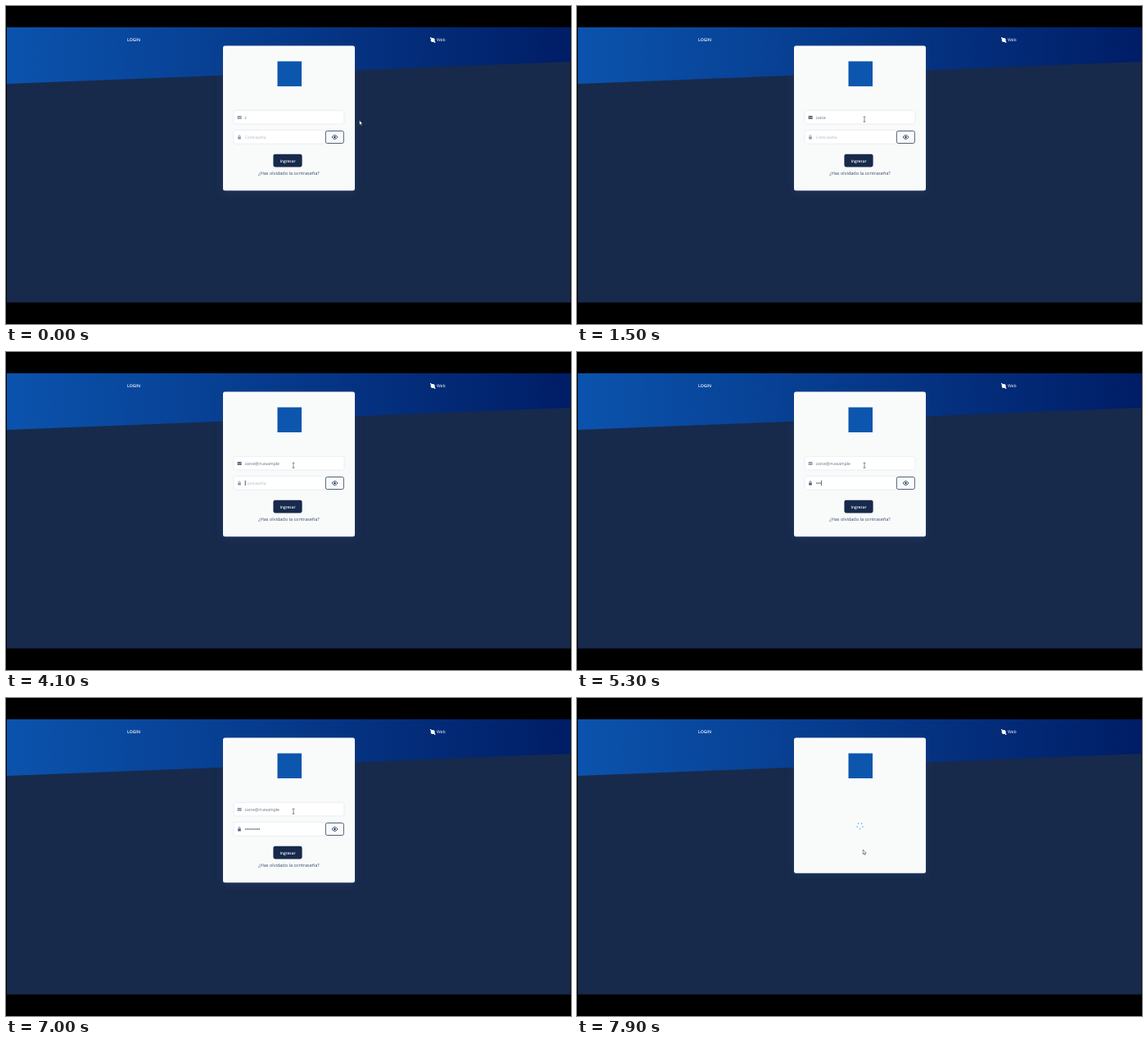
These frames come from a looping animation (690 by 388 pixels, 8 s). An HTML page:

```html
<!DOCTYPE html>
<html lang="es">
<head>
<meta charset="utf-8">
<title>Login</title>
<style>
  html, body { margin: 0; width: 100%; height: 100%; overflow: hidden; background: #000; }
  svg { display: block; width: 690px; height: 388px; }
  text { font-family: "Open Sans", "Noto Sans", sans-serif; text-rendering: geometricPrecision; white-space: pre; }
  .card { fill: #f9fbfb; filter: drop-shadow(0 2px 5px rgba(42, 64, 112, .5)); }
  .field { fill: #fff; filter: drop-shadow(0 .5px .8px rgba(50, 60, 93, .16)); }
  .typed { font-size: 4.95px; fill: #56627a; }
  .caret { fill: #222b3d; }
</style>
</head>
<body>
<svg viewBox="0 0 690 388">
  <defs>
    <linearGradient id="sky" gradientUnits="userSpaceOnUse" x1="1" y1="60" x2="689" y2="40">
      <stop offset="0" stop-color="#0b53ad"/>
      <stop offset=".5" stop-color="#06398a"/>
      <stop offset="1" stop-color="#001d66"/>
    </linearGradient>
  </defs>

  <rect width="690" height="388"/>
  <rect x="1" y="26" width="688.5" height="335.7" fill="#172a4c"/>
  <path d="M1 26H689.5V68L1 95Z" fill="url(#sky)"/>

  <g fill="#fff" font-size="5.1" font-weight="600">
    <text x="148" y="43.3">LOGIN</text>
    <text x="526" y="43.3" font-weight="500">Web</text>
    <circle cx="521.2" cy="41.5" r="2.5"/>
    <path d="M518.6 38.8L523.8 44.3" stroke="#fff" stroke-width="1.3" stroke-linecap="round"/>
  </g>

  <rect id="card" class="card" x="265" y="48.5" width="161" height="176.7" rx="2.5"/>
  <rect x="331.5" y="67.5" width="29.5" height="30.5" fill="#0d56ae"/>

  <g id="form">
    <rect class="field" x="278.5" y="128" width="134" height="15.5" rx="2"/>
    <rect class="field" x="278.5" y="152" width="112" height="15.8" rx="2"/>

    <g id="mail">
      <rect x="282.6" y="134" width="5" height="4" rx=".6"/>
      <path d="M282.7 135.1L285.1 136.7L287.5 135.1" fill="none" stroke="#fff" stroke-width=".5"/>
    </g>
    <g id="lock">
      <rect x="283.2" y="159.6" width="3.6" height="3" rx=".5"/>
      <path d="M284 159.7V158.6a1 1.1 0 0 1 2 0V159.7" fill="none" stroke="currentColor" stroke-width=".7"/>
    </g>

    <text id="email" class="typed" x="291.6" y="137.7"></text>
    <text id="hint" x="291.6" y="161.8" font-size="4.85" fill="#adb5c2">Contraseña</text>
    <g id="dots" fill="#303a4e"></g>
    <rect id="caret" class="caret" width=".7" height="6.4"/>

    <rect x="390.4" y="152.5" width="22" height="15" rx="2" fill="#f9fbfb" stroke="#2b3b5a" stroke-width=".8"/>
    <path d="M398 160Q401.5 155 405 160Q401.5 165 398 160Z" fill="none" stroke="#172a4c" stroke-width=".8"/>
    <circle cx="401.5" cy="160" r="1.2" fill="#172a4c"/>

    <rect x="326.4" y="180.8" width="35.2" height="15.6" rx="2.3" fill="#172a4c"/>
    <text x="344" y="190.5" font-size="4.8" font-weight="600" fill="#fff" text-anchor="middle">Ingresar</text>
    <text x="345.5" y="205.8" font-size="5.55" font-weight="500" fill="#344767" text-anchor="middle">¿Has olvidado la contraseña?</text>
  </g>

  <g id="spinner" fill="#79bdf0"></g>

  <g id="mouse">
    <path id="arrow" d="M0 0V5.6L1.3 4.5L2.1 6.4L3 6L2.2 4.1H3.9Z" fill="#fff" stroke="#222" stroke-width=".5"/>
    <path id="beam" d="M-1.4 -3H1.4M0 -3V3M-1.4 3H1.4" fill="none" stroke="#555" stroke-width=".7"/>
    <path id="hand" d="M-.6 .4Q0 -.4 .6 .4V2.6L3 3.2Q3.6 3.5 3.4 4.4L2.8 6.8H-.2L-2 4.4Q-1.8 3.4 -.6 4.2Z" fill="#fff" stroke="#222" stroke-width=".5"/>
  </g>
</svg>

<script>
const LOOP = 8000, LOAD = 7800, TAB = 4100;
const EMAIL = "zarce@m.example";
const emailKeys = [0, 300, 500, 1100, 1300, 2100, 2400, 2700, 2900, 3200, 3300, 3400, 3600, 3800, 4100];
const passKeys = [4700, 5100, 5300, 5500, 5600, 5800, 5900, 6000, 6200];
const caretOff = [[0, 200], [1500, 2100], [6400, 7200]];
// time, x, y
const path = [[0, 431.6, 139.5], [100, 431.6, 139.5], [700, 351, 138.3], [7100, 351, 138.3], [7600, 349, 186.8], [7800, 349.3, 185], [LOOP, 349.3, 185]];

const $ = id => document.getElementById(id);
const email = $("email"), caret = $("caret");
const count = (keys, t) => keys.filter(k => k <= t).length;
const show = (el, on) => el.setAttribute("visibility", on ? "inherit" : "hidden");
const clamp = v => Math.min(1, Math.max(0, v));

function circle(parent, cx, cy, r) {
  const c = document.createElementNS("http://www.w3.org/2000/svg", "circle");
  for (const [k, v] of Object.entries({ cx, cy, r })) c.setAttribute(k, v);
  parent.append(c);
}
passKeys.forEach((_, i) => circle($("dots"), 292.8 + i * 2.06, 160, 0.75));
for (let i = 0; i < 5; i++) {
  const a = i * Math.PI * 0.4;
  circle($("spinner"), 3.5 * Math.sin(a), -3.5 * Math.cos(a), 0.9);
}

function mouseAt(t) {
  const i = path.findIndex(p => p[0] > t);
  const [a, b] = [path[i - 1], path[i]];
  const u = (t - a[0]) / (b[0] - a[0]), e = u * u * (3 - 2 * u);
  return [a[1] + (b[1] - a[1]) * e, a[2] + (b[2] - a[2]) * e];
}

function tint(el, focus) {
  const c = [[141, 152, 172], [82, 95, 127]];
  const rgb = c[0].map((v, i) => Math.round(v + (c[1][i] - v) * focus));
  el.style.color = el.style.fill = `rgb(${rgb})`;
}

function drawMouse(t, loading) {
  const [x, y] = mouseAt(t);
  const inside = (l, top, r, b) => !loading && x > l && x < r && y > top && y < b;
  const beam = inside(278, 128, 412, 143.5) || inside(278, 152, 390, 168);
  const hand = inside(326, 181, 362, 196.5);
  $("mouse").setAttribute("transform", `translate(${x} ${y})`);
  show($("beam"), beam);
  show($("hand"), hand);
  show($("arrow"), !beam && !hand);
}

function draw(t) {
  const loading = t >= LOAD, inPass = t >= TAB;
  const typed = count(passKeys, t);

  email.textContent = EMAIL.slice(0, count(emailKeys, t));
  [...$("dots").children].forEach((d, i) => show(d, i < typed));
  show($("hint"), !typed);

  const end = inPass ? 291.8 + typed * 2.06 : 291.6 + email.getComputedTextLength();
  caret.setAttribute("x", end);
  caret.setAttribute("y", inPass ? 156.6 : 132.6);
  show(caret, !caretOff.some(([a, b]) => t >= a && t < b));

  const moved = clamp((t - 4200) / 200);
  tint($("mail"), clamp((t - 100) / 300) * (1 - moved));
  tint($("lock"), moved);

  show($("form"), !loading);
  show($("spinner"), loading);
  $("card").setAttribute("height", loading ? 165.2 : 176.7);
  $("spinner").setAttribute("transform", `translate(345.5 156) rotate(${(t - LOAD) * 0.36})`);
  drawMouse(t, loading);
}

const start = performance.now();
function tick() {
  draw((performance.now() - start) % LOOP);
  requestAnimationFrame(tick);
}
tick();
</script>
</body>
</html>
```
